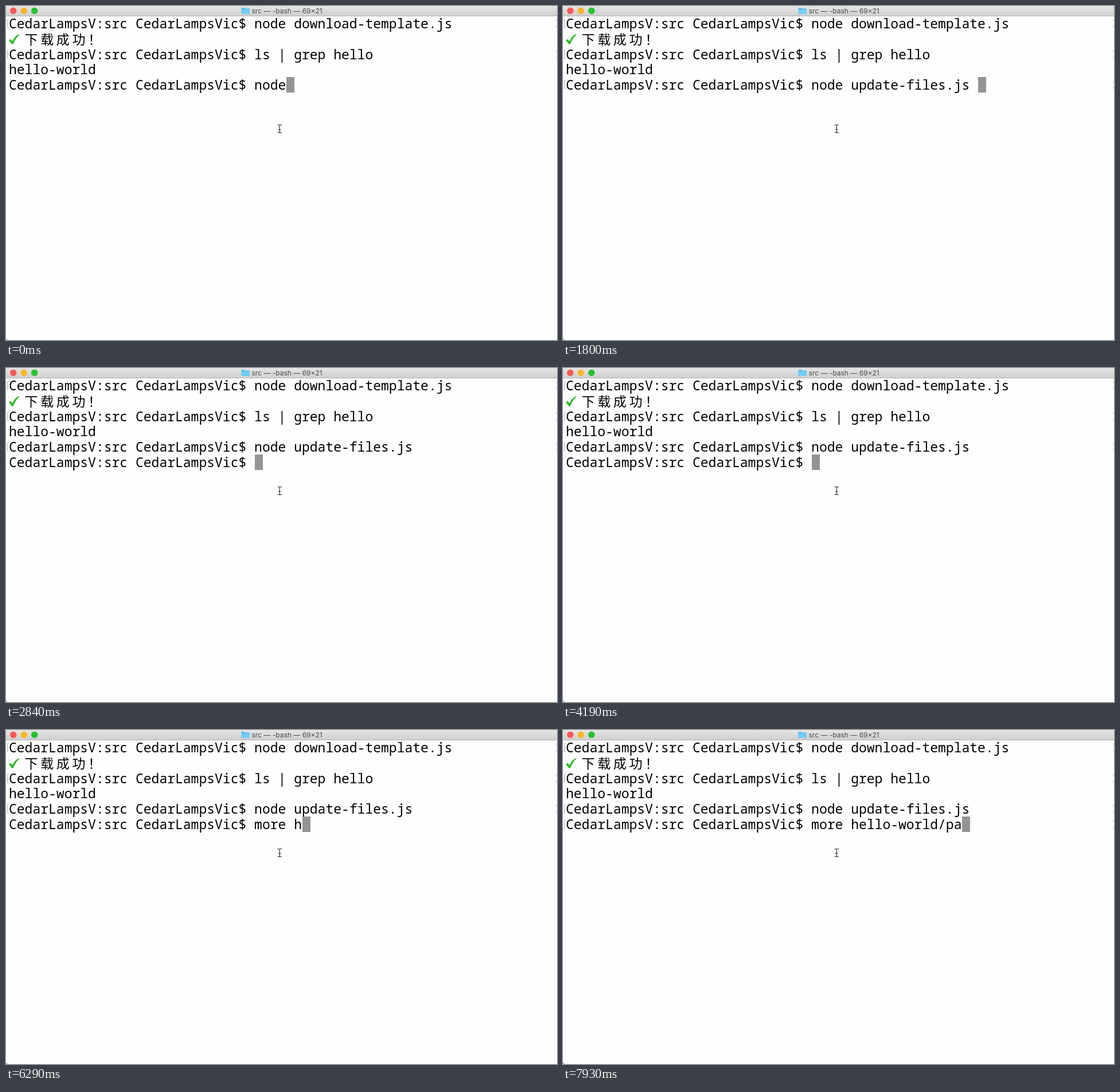
Write an HTML page that moves like this. It is 961 by 583 pixels and loops after 8 s.

```html
<!DOCTYPE html>
<html lang="zh-Hans">
<head>
<meta charset="utf-8">
<title>Terminal</title>
<style>
  html, body { margin: 0; width: 100%; height: 100%; overflow: hidden; background: #fefefe; }
  svg { display: block; width: 961px; height: 583px; }
  text { white-space: pre; }
  .mono { font: 500 23.03px "Noto Sans Mono", "DejaVu Sans Mono", monospace; font-variant-ligatures: none; }
  .cjk { font: 23px "Noto Sans CJK SC", "Noto Sans CJK", sans-serif; letter-spacing: 4.64px; }
  .title { font: 12px Inter, "Open Sans", sans-serif; fill: #4a4a4a; }
  .mark { fill: none; stroke: #b4b4b4; }
</style>
</head>
<body>
<svg viewBox="0 0 961 583">
  <defs>
    <linearGradient id="bar" x2="0" y2="1">
      <stop stop-color="#e5e5e5"/>
      <stop offset="1" stop-color="#d0d0d0"/>
    </linearGradient>
  </defs>
  <rect width="961" height="583" fill="#fefefe"/>
  <rect width="961" height="17" fill="url(#bar)"/>
  <rect y="17" width="961" height="1" fill="#b3b3b3"/>
  <circle cx="12.7" cy="8.3" r="5.8" fill="#fc5b57"/>
  <circle id="busy" cx="12.7" cy="8.3" r="1.9" fill="#7c0b08"/>
  <circle cx="31.2" cy="8.3" r="5.8" fill="#fdb52c"/>
  <circle cx="49.7" cy="8.3" r="5.8" fill="#29c131"/>
  <g id="folder">
    <path d="M0 1.2q0-1.2 1.2-1.2h3.6l1.4 1.4h7q1.3 0 1.3 1.2v7.2q0 1.2-1.2 1.2H1.2Q0 11 0 9.8z" fill="#55b9e8"/>
    <path d="M0 3h14.5v6.8q0 1.2-1.2 1.2H1.2Q0 11 0 9.8z" fill="#74cdf4"/>
  </g>
  <text id="title" class="title" y="13"></text>
  <g id="marks"></g>
  <path d="M5 60.2L8.2 57.6L11 61.6C14 55.6 17.6 51.2 22.6 49.2L23.2 50.2C18.4 54.6 14.8 60.4 12.6 66.4L9.8 66.6C8.6 64 7 61.8 5 60.2Z" fill="#2bb824"/>
  <text class="cjk" x="32.6" y="66.5">下载成功！</text>
  <g id="lines"></g>
  <rect id="cursor" width="14" height="27" fill="#949494"/>
  <path d="M473.5 207.5h2.2q1.5 0 1.5 1.5v10.5q0 1.5-1.5 1.5h-2.2M481 207.5h-2.2q-1.6 0-1.6 1.5M481 221h-2.2q-1.6 0-1.6-1.5M475 215.5h4.5" fill="none" stroke="#222" stroke-width="1.1"/>
  <path d="M0 580.5L2 583H0z" fill="#4a5a9a"/>
</svg>
<script>
const LOOP = 8000, LEFT = 5, CELL = 13.825, ROW = 26.75;
const PROMPT = "CedarLampsV:src CedarLampsVic$ ";
const RUN = "node update-files.js";

// start, input row, typed text, title state
const steps = [
  [0, 4, "node"],
  [300, 4, "node "],
  [1500, 4, "node up"],
  [1800, 4, RUN + " "],
  [2550, 5, null],
  [2700, 5, null, true],
  [2840, 5, ""],
  [4490, 5, "m"],
  [4640, 5, "mo"],
  [4790, 5, "more"],
  [5090, 5, "more "],
  [6290, 5, "more h"],
  [6440, 5, "more he"],
  [6730, 5, "more hello-world/"],
  [7780, 5, "more hello-world/p"],
  [7930, 5, "more hello-world/pa"]
];

const $ = id => document.getElementById(id);

function add(parent, tag, attrs) {
  const el = document.createElementNS("http://www.w3.org/2000/svg", tag);
  for (const key in attrs) el.setAttribute(key, attrs[key]);
  return parent.appendChild(el);
}

const lines = [], marks = [];
for (let row = 0; row < 6; row++) {
  const top = Math.round(17 + row * ROW);
  lines.push(add($("lines"), "text", { class: "mono", x: LEFT, y: 39 + row * ROW }));
  marks.push(add($("marks"), "path", {
    class: "mark",
    d: `M4.5 ${top + 6.5}h-2v14h2M960 ${top + 6.5}h.5v3M960.5 ${top + 17}v3.5h-.5`
  }));
}
lines[0].textContent = PROMPT + "node download-template.js";
lines[2].textContent = PROMPT + "ls | grep hello";
lines[3].textContent = "hello-world";

function show([, row, typed, busy]) {
  const input = typed === null ? "" : PROMPT + typed;
  lines[4].textContent = row === 4 ? input : PROMPT + RUN;
  lines[5].textContent = row === 5 ? input : "";
  const marked = [true, false, true, false,
    row === 5 || typed.length > 7, row === 5 && input.includes("/")];
  marks.forEach((mark, i) => mark.setAttribute("visibility", marked[i] ? "visible" : "hidden"));
  $("cursor").setAttribute("x", Math.round(LEFT + input.length * CELL));
  $("cursor").setAttribute("y", row === 4 ? 124 : 151);
  $("busy").setAttribute("visibility", busy ? "visible" : "hidden");
  $("title").textContent = `src — ${busy ? RUN : "-bash"} — 69×21`;
  $("title").setAttribute("x", busy ? 389 : 428.5);
  $("folder").setAttribute("transform", `translate(${busy ? 371 : 410.5} 3)`);
  $("folder").setAttribute("opacity", busy ? 0.6 : 1);
}

let current;
function tick() {
  const time = performance.now() % LOOP;
  const step = steps.findLast(s => s[0] <= time);
  if (step !== current) show(current = step);
  requestAnimationFrame(tick);
}
tick();
</script>
</body>
</html>
```
